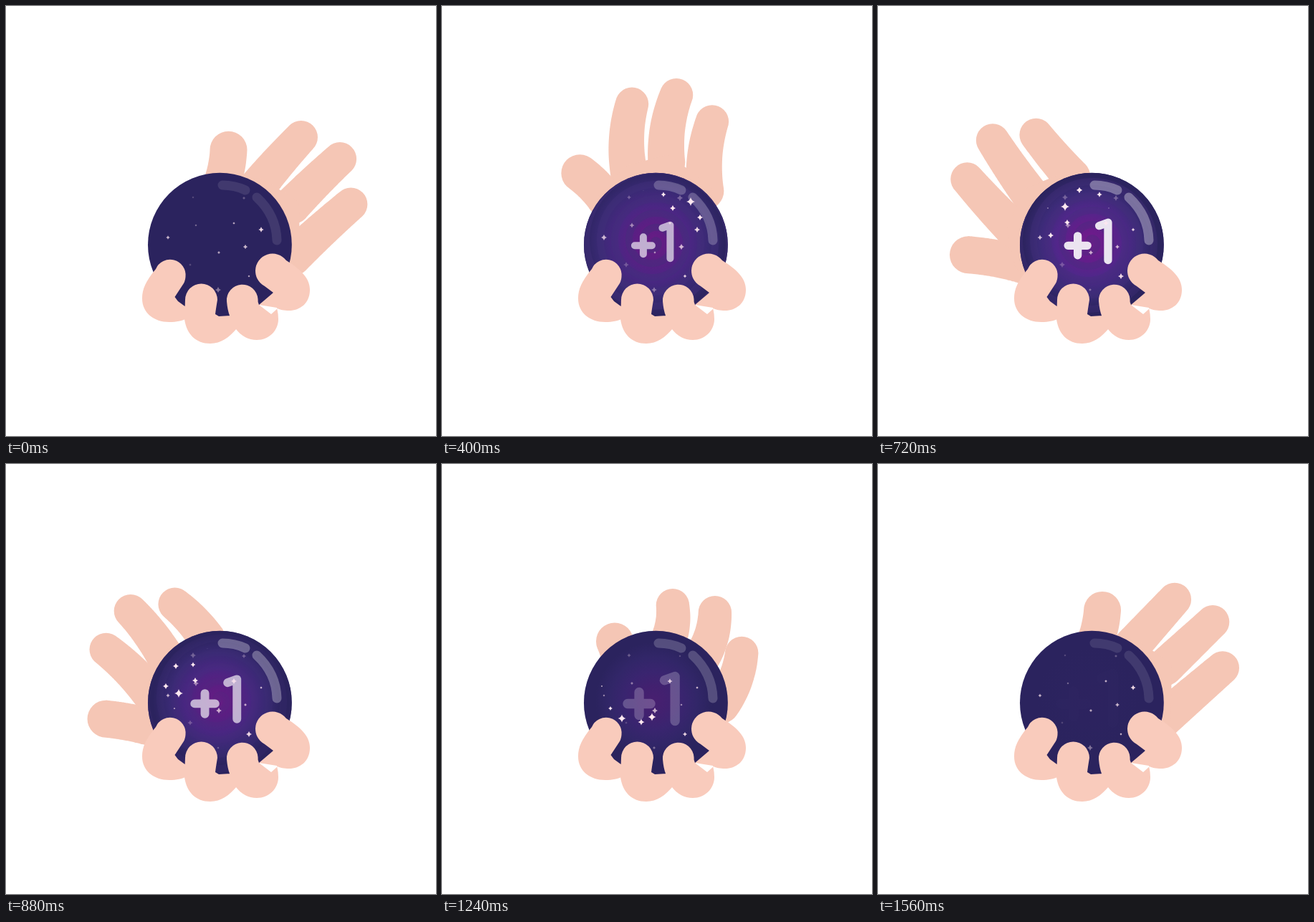
An HTML page with a canvas that plays this animation: 600 by 600 pixels, repeating every 1600 ms.

```html
<!DOCTYPE html>
<html lang="en">
<head>
<meta charset="utf-8">
<title>Crystal ball</title>
<style>
html, body { margin: 0; width: 100%; height: 100%; overflow: hidden; background: #fff; }
canvas { display: block; }
</style>
</head>
<body>
<canvas id="stage" width="600" height="600"></canvas>
<script>
const ctx = document.getElementById('stage').getContext('2d');
const LOOP = 1600, STEP = 40, TAU = Math.PI * 2;
const CX = 298.4, CY = 333.2, R = 100.4;

const mix = (a, b, u) => a + (b - a) * u;
const clamp = u => Math.min(1, Math.max(0, u));
const ease = u => u * u * (3 - 2 * u);

// Smooth periodic curve through one value per key time.
const times = [0, 160, 400, 720, 800, 1040, 1240, 1560];
function curve(values) {
  const n = times.length;
  const at = i => times[(i + n) % n] + LOOP * Math.floor(i / n);
  const val = i => values[(i + n) % n];
  const rate = i => (val(i + 1) - val(i)) / (at(i + 1) - at(i));
  const slope = i => {
    const before = at(i) - at(i - 1), after = at(i + 1) - at(i);
    return (rate(i - 1) * after + rate(i) * before) / (before + after);
  };
  return t => {
    let i = n - 1;
    while (times[i] > t) i--;
    const h = at(i + 1) - at(i), u = (t - at(i)) / h, v = 1 - u;
    return v * v * (1 + 2 * u) * val(i) + u * u * (1 + 2 * v) * val(i + 1)
      + h * u * v * (v * slope(i) - u * slope(i + 1));
  };
}

// The hand swings around the ball: direction in degrees and reach of its middle finger.
const handAngle = curve([54.4, 40.5, 7.8, -43.5, -47, -21.7, 33.2, 56.2]);
const handReach = curve([206, 211.7, 211, 201, 195, 142, 150.6, 203]);

const grip = new Path2D(`
  M209 367 C195 384 190 395 190 408 C190 428 206 441 228 441 C238 441 246 439 250 437
  L251 420 L240 412 L235.5 406 L246 390 Q250 385 250.5 378 A21.7 21.7 0 0 0 209 367Z
  M250 410 L249 437 C252 458 265 471 285 471 C300 471 312 462 322 450 L313 432 L297 433
  L292 430 Q293 422 295 410 A22.5 22.5 0 0 0 250 410Z
  M308 412 Q309 424 312 432 L321 451 C328 460 338 466 350 466 C367 466 380 453 380 437
  Q380 430 378 421 L353 417 Q351 412 351.5 409 A21.8 21.8 0 0 0 308 412Z
  M391 355 C412 368 424 380 424 396 C424 415 410 425 395 425 C388 425 382 424 379 422
  L370 430 L353 417 L373 400 L361 391 C351 385 348 377 348 369 A24 24 0 0 1 391 355Z`);
const highlights = new Path2D('M302 250 Q319 250 334 257 M350 267 Q377 292 378 327');
const plusOne = new Path2D('M-29.5 1 H-5.5 M-17.5 -11 V13 M9 -23.5 L20 -27.5 V19');

// Steady stars in the order they peak: x, y, opacity.
const stars = [
  [296, 396, .4], [356, 312, .9], [334, 336, .75], [226, 323, .75], [332, 268, .3], [257, 361, .25],
  [265, 306, .5], [261, 267, .3], [339, 377, .9], [318, 303, .8], [297, 344, .7]
];
// Bright sparkles light up one after another, anticlockwise.
const sparkles = [
  [360, 295], [347, 273], [322, 282], [309, 263], [281, 257], [261, 280], [264, 302],
  [241, 320], [237, 282], [223, 310], [235, 341], [251, 355], [278, 360], [293, 353]
];

function stroke(path, color, width, alpha = 1) {
  ctx.globalAlpha = alpha;
  ctx.strokeStyle = color;
  ctx.lineWidth = width;
  ctx.stroke(path);
  ctx.globalAlpha = 1;
}

// A bent limb, round at both ends and tapering from base to tip.
function drawFinger([x, y], [bx, by], bend, tipRadius, baseRadius) {
  const dx = bx - x, dy = by - y, k = 2 * bend / Math.hypot(dx, dy);
  ctx.beginPath();
  for (let u = 0; u <= 1; u += 1 / 64) {
    const bow = k * u * (1 - u), r = mix(tipRadius, baseRadius, u);
    const px = mix(x, bx, u) - dy * bow, py = mix(y, by, u) + dx * bow;
    ctx.moveTo(px + r, py);
    ctx.arc(px, py, r, 0, TAU);
  }
  ctx.fill();
}

function drawHand(t) {
  const degrees = handAngle(t), reach = handReach(t), size = reach / 205;
  const sin = Math.sin(degrees * TAU / 360), cos = Math.cos(degrees * TAU / 360);
  const place = (across, along) => [CX + along * sin + across * cos, CY - along * cos + across * sin];
  const lean = .3 * degrees + .2 * (205 - reach), tilt = 4 - .12 * degrees;
  const bend = 11 * Math.sin(TAU * (t + 40) / LOOP);
  const curl = 9 * Math.cos(2 * TAU * t / LOOP);

  const tips = [
    place(-120 + 1.2 * lean, 92 * size - .9 * lean + curl),
    place(-60 + .25 * lean, reach - 24 + tilt),
    place(0, reach),
    place(54 + .4 * lean, reach - 27 - tilt)
  ];
  const bases = [
    place(-80 + .8 * lean, 150 * size - 100),
    place(-52 + lean, 92 * size),
    place(-2 + lean, 113 * size),
    place(57 + lean, 82 * size - .6 * lean)
  ];

  ctx.fillStyle = '#f5c6b5';
  tips.forEach((tip, i) => i
    ? drawFinger(tip, bases[i], bend, 23.2, 26)
    : drawFinger(tip, bases[i], -4, 26, 26));
  const palm = new Path2D();
  for (const point of [...bases, [CX, CY]]) palm.lineTo(...point);
  palm.closePath();
  ctx.fill(palm);
  stroke(palm, ctx.fillStyle, 20);
}

function drawStar(x, y, size, alpha = 1) {
  if (size <= 0) return;
  const c = size * .2;
  ctx.beginPath();
  ctx.moveTo(x, y - size);
  ctx.quadraticCurveTo(x + c, y - c, x + size, y);
  ctx.quadraticCurveTo(x + c, y + c, x, y + size);
  ctx.quadraticCurveTo(x - c, y + c, x - size, y);
  ctx.quadraticCurveTo(x - c, y - c, x, y - size);
  ctx.fillStyle = `rgba(255, 232, 240, ${alpha})`;
  ctx.fill();
}

function drawBall(t) {
  const rise = ease(clamp((t - 100) / 460)), fade = clamp(1 - (t - 720) / 860);
  ctx.save();
  ctx.beginPath();
  ctx.arc(CX, CY, R, 0, TAU);
  ctx.fillStyle = '#2b235e';
  ctx.fill();
  ctx.clip();

  const light = ctx.createRadialGradient(295, 330, 0, 295, 330, 112 - 40 * t / LOOP);
  ['#741a8c', '#651d8a', '#50278a', '#3c2b78', '#2b235e']
    .forEach((color, i) => light.addColorStop(i / 4, color));
  ctx.globalAlpha = Math.sqrt(rise) * fade;
  ctx.fillStyle = light;
  ctx.fillRect(CX - R, CY - R, 2 * R, 2 * R);

  const spiral = new Path2D();
  for (let a = 0; a < TAU * 5.5; a += .1) {
    const r = 20 * a / TAU, turn = a - TAU * t / LOOP;
    spiral.lineTo(296 + r * Math.cos(turn), 329 + r * Math.sin(turn));
  }
  stroke(spiral, '#43307a', 10, .45 * Math.sin(Math.PI * clamp(t / 1000)));
  stroke(highlights, '#fff', 13, .1 + .24 * rise * rise * fade);

  const scale = 1 + (t - 400) * .0004;
  ctx.save();
  ctx.translate(CX, CY);
  ctx.scale(scale, scale);
  stroke(plusOne, '#fff', 10, .88 * rise * fade ** 1.5);
  ctx.restore();

  stars.forEach(([x, y, alpha], i) =>
    drawStar(x, y, 2.9 + 1.4 * Math.cos(TAU * (t - 160 - 90 * i) / LOOP), alpha));
  sparkles.forEach(([x, y], i) => {
    const gap = Math.abs(t - 340 - 75 * i), away = Math.min(gap, LOOP - gap) / 250;
    drawStar(x, y, (4.6 + i % 2 * 1.4) * (1 - away * away));
  });
  ctx.restore();
}

function draw(now) {
  const t = Math.floor(now % LOOP / STEP) * STEP;
  ctx.clearRect(0, 0, 600, 600);
  ctx.lineCap = ctx.lineJoin = 'round';
  drawHand(t);
  drawBall(t);
  ctx.fillStyle = '#f9cbbc';
  ctx.fill(grip);
  requestAnimationFrame(draw);
}
requestAnimationFrame(draw);
</script>
</body>
</html>
```
